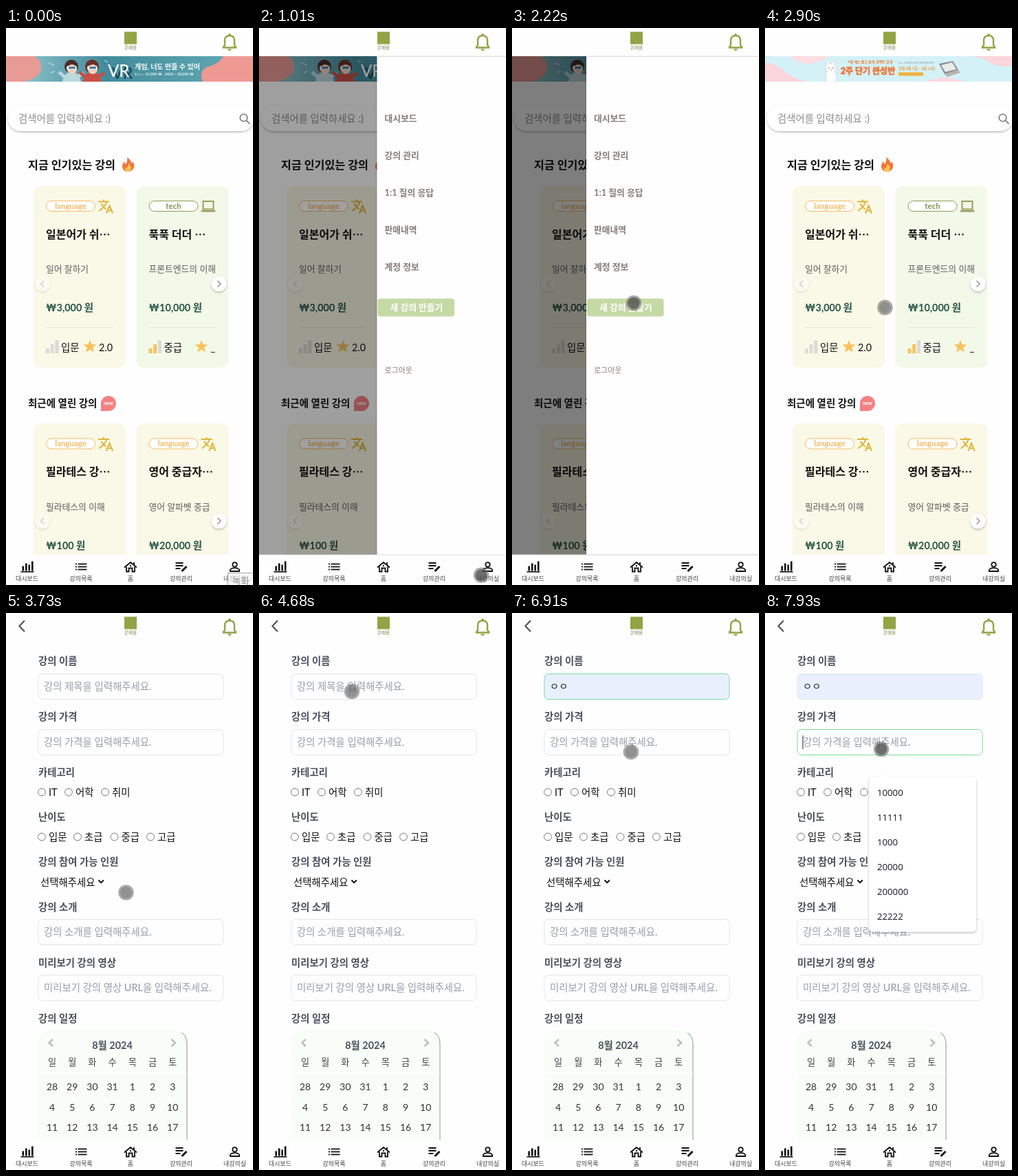
Animation of 359 by 810 pixels, one loop 8 s. Source, as an HTML page:

```html
<!DOCTYPE html>
<html lang="ko">
<head>
<meta charset="utf-8">
<title>강의 앱</title>
<style>
html, body { margin: 0; width: 100%; height: 100%; overflow: hidden; background: #fefefe; }
svg { display: block; width: 100vw; height: 100vh; }
text { font-family: Lato, "Noto Sans CJK KR", "Noto Sans CJK JP", "Noto Sans CJK", sans-serif; white-space: pre; }
.native text { font-family: "Open Sans", "Noto Sans CJK KR", "Noto Sans CJK JP", "Noto Sans CJK", sans-serif; }
.line { fill: none; stroke-linecap: butt; }
</style>
</head>
<body>
<svg id="stage" viewBox="0 0 359 810" preserveAspectRatio="none"></svg>
<script>
const LOOP = 8000;
const stage = document.getElementById('stage');

// Text is placed by its left edge (or anchor) and vertical centre.
const text = (x, cy, size, fill, str, weight = 400, anchor = 'start', extra = '') =>
  `<text x="${x}" y="${(cy + size * .36).toFixed(2)}" font-size="${size}" fill="${fill}" font-weight="${weight}" text-anchor="${anchor}" ${extra}>${str}</text>`;
const rect = (x, y, w, h, r, fill, extra = '') =>
  `<rect x="${x}" y="${y}" width="${w}" height="${h}" rx="${r}" fill="${fill}" ${extra}/>`;
const circle = (x, y, r, fill, extra = '') => `<circle cx="${x}" cy="${y}" r="${r}" fill="${fill}" ${extra}/>`;
const line = (d, stroke, w = 2, extra = '') => `<path class="line" d="${d}" stroke="${stroke}" stroke-width="${w}" ${extra}/>`;
const shape = (d, fill, extra = '') => `<path d="${d}" fill="${fill}" ${extra}/>`;
const at = (x, y, body, extra = '') => `<g transform="translate(${x} ${y})" ${extra}>${body}</g>`;
const group = (id, body, extra = '') => `<g id="${id}" ${extra}>${body}</g>`;

const OLIVE = '#93a445', GOLD = '#dfb53c', ORANGE = '#f8c35f', GREY = '#dcd9d8';

const translateIcon = line('M1 5h16M9 2v3M13.3 5C12.3 9 8 14.5 2 18.5M5.5 8Q8 13 12.6 16M12.9 22 17.5 10.8 22.1 22M14.6 18h6', GOLD, 2);
const laptopIcon = line('M4 4.5h15v11.5H4Z', '#9c9c62', 2) + rect(1, 17.5, 21, 2.5, 1, '#9c9c62');

function star(cx, cy, r) {
  const points = Array.from({ length: 10 }, (_, i) => {
    const a = i * Math.PI / 5 - Math.PI / 2, d = i % 2 ? r * .43 : r;
    return (cx + d * Math.cos(a)).toFixed(1) + ',' + (cy + d * Math.sin(a)).toFixed(1);
  });
  return `<polygon points="${points.join(' ')}" fill="${ORANGE}"/>`;
}

function card(x, y, c) {
  const tech = c.kind === 'tech';
  const bars = [7, 13, 19].map((h, i) => rect(18 + i * 6.7, 243 - h, 5, h, .5, i < c.filled ? ORANGE : GREY)).join('');
  return at(x, y,
    rect(0, 0, 134, 264, 10, tech ? '#f3f9e8' : '#faf8e6') +
    rect(18.5, 21.5, 71, 15, 7.5, '#fff', `stroke="${tech ? '#8a9c55' : '#f3bb62'}"`) +
    text(54, 28.5, 11.5, tech ? '#7f9150' : '#f2ba62', c.kind, 700, 'middle') +
    at(93, 17.5, tech ? laptopIcon : translateIcon) +
    text(18, 70, 16, '#111', c.title, 700) +
    text(18, 120.5, 12.8, '#5c5c5c', c.about) +
    text(18, 177, 14.4, '#275545', c.price, 700) +
    line('M18 205.5h98', '#ebe8d8', 1) + bars +
    text(40, 234.5, 14.4, '#111', c.level) + star(tech ? 94.5 : 82, 233.5, 10) +
    text(tech ? 108 : 95, 234.5, 14.4, '#111', c.score));
}

const arrowButton = (x, y, dir, alpha) => at(x, y,
  circle(0, 0, 11, '#fff', 'filter="url(#soft)"') +
  line(`M${-2 * dir} -4.5L${2.5 * dir} 0L${-2 * dir} 4.5`, '#999', 1.6), `opacity="${alpha}"`);

function vrBanner() {
  const kid = (x, y, hair, coat) =>
    line(`M${x - 9} 72L${x - 18} 64M${x + 9} 71L${x + 18} 65`, coat, 5, 'stroke-linecap="round"') +
    shape(`M${x - 13} 78Q${x - 11} ${y + 9} ${x} ${y + 8}Q${x + 12} ${y + 9} ${x + 14} 78Z`, coat) +
    circle(x, y, 10, hair) + circle(x + 1, y + 4, 7, '#f4cfba') +
    rect(x - 7, y - 1, 15, 6, 2.5, '#e9eef0') + rect(x - 4, y, 10, 3.5, 1.5, '#5d7f8c');
  return rect(0, 41, 359, 37, 0, 'url(#teal)') +
    shape('M0 41H42Q56 51 49 65Q45 73 28 78H0Z', '#e89a95') +
    shape('M359 41H316Q309 53 291 57Q280 65 286 78H359Z', '#ee9a93') +
    line('M62 51l8 3M65 65l6-2M143 47l5 3', '#dceff0', 1) +
    kid(95, 56, '#4b2c29', '#bcd8df') + kid(125, 56, '#6b3027', '#c94f45') +
    text(154, 66, 23, '#1b4455', 'VR', 500) + text(148, 62, 24, '#fff', 'VR', 500) +
    text(187, 56, 10, '#fff', '게임, 너도 만들 수 있어', 700) +
    text(187, 67.5, 5.4, '#e8f4f4', 'C++ ~ 24,000 ₩   JAVA ~ 30,000 ₩', 700);
}

function campBanner() {
  return rect(0, 41, 359, 37, 0, '#d3f1f7') +
    shape('M0 50Q16 52 28 62Q40 74 62 78H0Z', '#fbd5dc') + shape('M36 41H92Q70 57 52 50Q42 47 36 41Z', '#fbdde2') +
    shape('M359 78V54Q340 60 325 49Q316 43 298 41H359Z', '#fbd5dc') + shape('M232 78Q262 67 290 78Z', '#fbd9df') +
    shape('M89 78Q87 66 91 63Q86 57 90 53L89 48Q92 45 94 52L97 52Q99 45 101 48L101 54Q106 59 101 64Q105 68 103 78Z', '#fff', 'stroke="#d9cfc9" stroke-width=".7"') +
    circle(93, 58, .8, '#555') + circle(99, 58, .8, '#555') + circle(96, 61, 1, '#f2a091') +
    text(121, 49.5, 4.9, '#e8782e', '8월 에는 짧고 굵게, 임팩트 있게', 700) +
    text(110, 63, 12.1, '#ef7434', '2주 단기 완성반', 900, 'start', 'stroke="#ef7434" stroke-width=".6"') +
    text(194, 51, 3.8, '#8a8a8a', 'C++ 기초부터 실전 프로젝트까지') +
    text(194, 59, 5.2, '#ee9a3a', '신청 8월 1일 ~ 8월 16일', 700) +
    rect(194, 64.5, 36, 5, 0, '#efb13c') +
    shape('M253 52L273 48L281 61L261 67Z', '#8d8d8d') + shape('M256 54L272 50L278 60L262 64Z', '#e8ecec') +
    shape('M261 67L281 61L284 65L265 71Z', '#b9b4ae');
}

function home() {
  const language = { kind: 'language', filled: 0, level: '입문', score: '2.0' };
  return rect(0, 41, 359, 725, 0, '#fefefe') +
    `<g clip-path="url(#bannerBox)">${group('vr', vrBanner())}${group('camp', campBanner())}</g>` +
    rect(3, 113, 357, 37, 18.5, '#fff', 'filter="url(#soft)"') +
    text(18, 131.5, 14.4, '#8d8d8d', '검색어를 입력하세요 :)', 500) +
    circle(345.5, 130.5, 5.3, 'none', 'stroke="#777" stroke-width="1.5"') + line('M349.5 134.5l5 5', '#777', 1.7) +
    text(32, 199, 16.2, '#111', '지금 인기있는 강의', 700) +
    shape('M176 188Q182 192 182.5 197Q184 196 184 193.5Q188 200 185 205Q182 209 177 209Q169 208 169 201Q169 197 172 194Q172 197 174 198Q177 194 176 188Z', '#f0763b') +
    shape('M178 197Q183 202 181.5 206Q180 209 177 209Q172 208 173 203Q175 205 176 203Q178 200 178 197Z', '#ffc654') +
    card(40, 230, { ...language, title: '일본어가 쉬⋯', about: '일어 잘하기', price: '₩3,000 원' }) +
    card(189.5, 230, { kind: 'tech', filled: 2, level: '중급', score: '_', title: '푹푹 더더 ⋯', about: '프론트엔드의 이해', price: '₩10,000 원' }) +
    arrowButton(53, 372, -1, .4) + arrowButton(309.5, 372, 1, 1) +
    text(32, 546, 14.5, '#111', '최근에 열린 강의', 700) +
    shape('M138 557V546A11 11 0 1 1 149 557Z', '#f58184') + text(149, 546, 5.6, '#fff', 'NEW', 900, 'middle') +
    card(40, 575.5, { ...language, title: '필라테스 강⋯', about: '필라테스의 이해', price: '₩100 원' }) +
    card(189.5, 575.5, { ...language, title: '영어 중급자⋯', about: '영어 알파벳 중급', price: '₩20,000 원' }) +
    arrowButton(53, 717, -1, .4) + arrowButton(309.5, 717, 1, 1);
}

function drawer() {
  const items = ['대시보드', '강의 관리', '1:1 질의 응답', '판매내역', '계정 정보'];
  return rect(108, 41, 260, 725, 0, '#fefefe', 'filter="url(#soft)"') +
    line('M108 41.5H359', '#dedede', 1) +
    items.map((s, i) => text(119, 131.5 + 54 * i, 12.8, '#857d7a', s, 700)).join('') +
    rect(109, 393.5, 111.5, 26, 4, '#c5d9a5') + text(127, 406.5, 12.8, '#fff', '새 강의 만들기', 700) +
    text(119, 498.5, 11, '#857d7a', '로그아웃');
}

const INK = '#4b505a';
const field = (id, y, hint) =>
  rect(47, y, 269, 37, 6, '#fefefe', `id="${id}" stroke="#e1e5ed"`) +
  text(55, y + 18.5, 14.4, '#979ea9', hint, 500, 'start', `id="${id}Hint"`);
const radios = (y, xs, names) =>
  xs.map((x, i) => circle(x, y, 5.4, '#fff', 'stroke="#777"') + text(x + 10, y, 14.4, '#111', names[i])).join('');

function calendar() {
  const column = i => 67 + 29.2 * i;
  const dates = Array.from({ length: 21 }, (_, i) => i < 4 ? 28 + i : i - 3);
  return shape('M47 770V625Q47 607 65 607H245Q263 607 263 625V770Z', '#f8fef7') +
    line('M255 610.5Q263 615 263 626V770', '#8f9394', 1) +
    line('M68 620l-5.5 5 5.5 5M240.5 620l5.5 5-5.5 5', '#bdbfbd', 2.6) +
    text(154.5, 629, 14.4, INK, '8월 2024', 700, 'middle') +
    [...'일월화수목금토'].map((s, i) => text(column(i), 653, 13.2, '#444', s, 400, 'middle')).join('') +
    line('M47 669.5H263', '#fff', 1.5) +
    dates.map((n, i) => text(column(i % 7), 689 + 29.5 * Math.floor(i / 7), 14, '#333', n, 400, 'middle')).join('');
}

function form() {
  const labels = ['강의 이름', '강의 가격', '카테고리', '난이도', '강의 참여 가능 인원', '강의 소개', '미리보기 강의 영상', '강의 일정'];
  const centres = [69.5, 150.5, 231.5, 296.5, 361.5, 427.5, 508.5, 589.5];
  return rect(0, 0, 359, 766, 0, '#fefefe') + line('M27 11l-7.5 8 7.5 8', '#555', 2.2) +
    labels.map((s, i) => text(47, centres[i], 14.4, INK, s, 700)).join('') +
    field('name', 88.5, '강의 제목을 입력해주세요.') + field('price', 169.5, '강의 가격을 입력해주세요.') +
    field('intro', 445.5, '강의 소개를 입력해주세요.') + field('video', 526.5, '미리보기 강의 영상 URL을 입력해주세요.') +
    text(55, 107, 14.4, '#222', '', 400, 'start', 'id="nameValue"') +
    rect(54.5, 178, 1, 20, 0, '#222', 'id="caret"') +
    radios(260.5, [52, 91, 144], ['IT', '어학', '취미']) + radios(325.5, [52, 104, 157.5, 210], ['입문', '초급', '중급', '고급']) +
    text(50, 391.5, 14.4, '#111', '선택해주세요') + line('M134.5 388.5l3.7 3.7 3.7-3.7', '#111', 2) + calendar();
}

const ROW = 36.1;
const names = ['한도윤', 'ㅇㅇ', '오류 test', '11', 'ddddd', '콩마루'];
const prices = ['10000', '11111', '1000', '20000', '200000', '22222'];
const popup = (id, y, rows) => group(id,
  shape(`M157 ${y}H165L172 ${y - 7}L179 ${y}H301Q307 ${y} 307 ${y + 6}V${y + 219}Q307 ${y + 225} 301 ${y + 225}H157Q151 ${y + 225} 151 ${y + 219}V${y + 6}Q151 ${y} 157 ${y}Z`, '#fff', 'filter="url(#soft)"') +
  rect(151, y + 4, 156, ROW, 0, '#eeeeee', `id="${id}Hover" opacity="0"`) +
  rows.map((s, i) => text(163, y + 22.5 + ROW * i, 13.2, '#15151f', s)).join(''), 'class="native"');

function header() {
  const bell = shape('M316 28.5V27.5L318 25V17.5Q318 11.5 325 11Q332 11.5 332 17.5V25L334 27.5V28.5Z', 'none', `stroke="${OLIVE}" stroke-width="2.4"`);
  return rect(172, 5.5, 18, 18, 0, OLIVE) + text(181, 28.5, 6.6, '#7f8b4c', '온배움', 400, 'middle') +
    bell + circle(325, 10, 1.9, OLIVE) + shape('M322 30.5h6Q327.5 33 325 33Q322.5 33 322 30.5Z', OLIVE);
}

function nav() {
  const black = '#111';
  const icons = [
    line('M-9 7.3H10', black, 1.6) + [[-7, 7], [-2.5, 11], [2, 9], [6.5, 14]].map(([x, h]) => rect(x, 6 - h, 2.6, h, 0, black)).join(''),
    [-4, 0, 4].map(y => rect(-8, y - .9, 2, 1.8, 0, black) + rect(-4.5, y - .9, 13, 1.8, 0, black)).join(''),
    line('M-9 1L0-6.5L9 1M-6 0V7H-2.5V2H2.5V7H6V0M5-3V-6.5', black, 1.8) + circle(0, -1.5, 1.2, black),
    line('M-8-5.5H3M-8-1.5H3M-8 2.5H-1', black, 1.8) + line('M1 6.5L8-.5', black, 3),
    circle(0, -3.2, 3.2, 'none', `stroke="${black}" stroke-width="1.8"`) + line('M-6.6 6.5V4.5Q-5 1.6 0 1.6Q5 1.6 6.6 4.5V6.5Z', black, 1.8),
  ];
  const labels = ['대시보드', '강의목록', '홈', '강의관리', '내강의실'], xs = [30.5, 109, 181, 254.5, 332.5];
  return rect(0, 766, 359, 44, 0, '#fefefe') +
    group('navLine', line('M0 766H359', '#d2d2d2', 1.2)) +
    xs.map((x, i) => at(x, 783.5, icons[i]) + text(x, 800.5, 9, '#444', labels[i], 400, 'middle')).join('');
}

stage.innerHTML = `<defs>
  <filter id="soft" x="-20%" y="-30%" width="140%" height="170%"><feDropShadow dx="0" dy="1.5" stdDeviation="1.8" flood-opacity=".28"/></filter>
  <linearGradient id="teal"><stop offset=".1" stop-color="#84bcc5"/><stop offset=".4" stop-color="#428b9c"/><stop offset=".85" stop-color="#5ba4af"/></linearGradient>
  <clipPath id="bannerBox"><rect y="41" width="359" height="37"/></clipPath>
  </defs>` + rect(0, 0, 359, 810, 0, '#fefefe') +
  group('home', home()) + rect(0, 41, 359, 725, 0, '#000', 'id="shade"') + group('drawer', drawer()) +
  group('form', form()) + header() + nav() + popup('namePopup', 149, names) + popup('pricePopup', 238.5, prices) +
  group('tip', rect(322.5, 792.5, 40, 20, 0, '#f6f6f6', 'stroke="#aaa" fill-opacity=".65"') + text(329, 804.5, 13.5, '#8c8c8c', '녹화')) +
  group('touch', circle(0, 0, 11.3, '#666', 'opacity=".55"') + circle(0, 0, 8.5, '#444', 'id="press"')) +
  group('pointer', shape('M0 0V17L4 13.3L6.7 19.5L9.3 18.4L6.7 12.3H12Z', '#fff', 'stroke="#111" stroke-width="1.1"'));

const el = {};
stage.querySelectorAll('[id]').forEach(node => el[node.id] = node);
const set = (id, attr, value) => el[id].setAttribute(attr, value);
const show = (id, alpha) => { set(id, 'opacity', +alpha); set(id, 'visibility', +alpha ? 'visible' : 'hidden'); };
const progress = (t, from, to) => Math.min(1, Math.max(0, (t - from) / (to - from)));
const ease = p => p * p * (3 - 2 * p);
const between = (t, from, to) => t >= from && t < to;

// Pointer stops: time, x, y.
const path = [
  [480, 322, 822], [740, 322, 798], [940, 322, 798], [1150, 325.5, 789.5], [1500, 325.5, 789.5],
  [2220, 177, 400], [2550, 177, 400], [2850, 174.5, 406.5], [4220, 174.5, 406.5], [4680, 135, 114],
  [5020, 134, 98], [5650, 134, 98], [5960, 172, 155], [6150, 177, 229], [6380, 176, 210],
  [6600, 176, 210], [7270, 169, 192], [7929, 169, 192], [7930, 169, 198],
];
function pointerAt(t) {
  const i = path.findIndex(stop => stop[0] > t);
  if (i < 0) return path[path.length - 1].slice(1);
  if (i === 0) return path[0].slice(1);
  const [a, b] = [path[i - 1], path[i]], p = ease(progress(t, a[0], b[0]));
  return [a[1] + (b[1] - a[1]) * p, a[2] + (b[2] - a[2]) * p];
}

function draw(t) {
  const [x, y] = pointerAt(t);
  const onForm = t >= 3730;
  show('tip', t < 70 ? 1 : t < 140 ? .4 : 0);
  show('home', !onForm);
  show('form', onForm);

  const open = t < 2000 ? 1 - (1 - progress(t, 900, 1200)) ** 3 : 1 - ease(progress(t, 2510, 2880));
  show('shade', open * .5);
  show('drawer', open > 0);
  show('navLine', open);
  set('drawer', 'transform', `translate(${254 * (1 - open)} 0)`);

  const slide = ease(progress(t, 2520, 2880));
  set('vr', 'transform', `translate(${-359 * slide} 0)`);
  set('camp', 'transform', `translate(${359 * (1 - slide)} 0)`);

  const onPopup = between(t, 5900, 6580);
  const hovered = between(t, 5980, 6580) ? Math.max(0, Math.floor((y - 153) / ROW)) : -1;
  const filled = t >= 6580;
  show('namePopup', filled ? 0 : progress(t, 5080, 5290));
  show('pricePopup', progress(t, 7430, 7640));
  set('namePopupHover', 'opacity', hovered >= 0 ? 1 : 0);
  set('namePopupHover', 'y', 153 + ROW * Math.max(0, hovered));

  const value = filled ? 'ㅇㅇ' : hovered >= 0 ? names[hovered] : '';
  el.nameValue.textContent = value;
  set('nameValue', 'font-size', filled ? 14.4 : 13);
  show('nameHint', onForm && !value);
  set('name', 'fill', value ? '#e8f0fe' : '#fefefe');
  set('name', 'stroke', between(t, 5080, 7400) ? '#7fdc9d' : '#e1e5ed');
  set('price', 'stroke', t >= 7400 ? '#7fdc9d' : '#e1e5ed');
  show('caret', t >= 7430);
  for (const id of ['priceHint', 'introHint', 'videoHint']) show(id, onForm);

  const pressed = between(t, 880, 1500) || between(t, 2150, 2600) || t >= 7350;
  set('press', 'opacity', pressed ? .6 : .25);
  show('touch', t >= 480 && !onPopup);
  show('pointer', onPopup);
  for (const id of ['touch', 'pointer']) set(id, 'transform', `translate(${x.toFixed(2)} ${y.toFixed(2)})`);
}

const start = performance.now();
function tick() {
  draw((performance.now() - start) % LOOP);
  requestAnimationFrame(tick);
}
tick();
</script>
</body>
</html>
```
